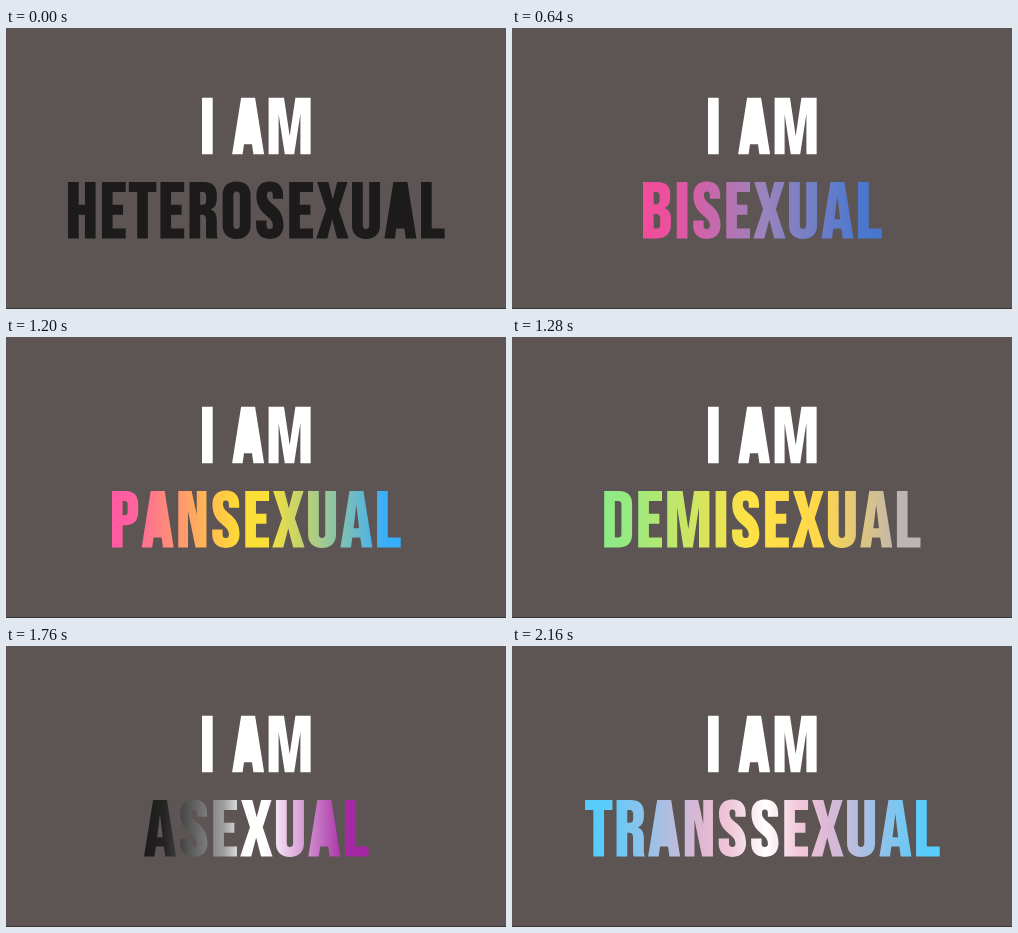
An HTML page for the animation above (2.24 s loop, 500x281 px).

```html
<!DOCTYPE html>
<html lang="en">
<head>
<meta charset="utf-8">
<title>I am</title>
<style>
  html, body { margin: 0; width: 100%; height: 100%; overflow: hidden; background: #5d5553; }
  svg { display: block; width: 100%; height: 100%; }
  clipPath path { clip-rule: evenodd; }
  .word { visibility: hidden; animation: turn 2240ms step-end infinite; }
  @keyframes turn {
    0% { visibility: visible; }
    14.2857%, 100% { visibility: hidden; }
  }
</style>
</head>
<body>
<svg id="stage" viewBox="0 0 500 281" preserveAspectRatio="none" role="img">
  <rect width="500" height="281" fill="#5d5553"/>
  <rect y="280" width="500" height="1" fill="#3c3736"/>
</svg>
<script>
const SLOT = 320, CENTER = 250.4, TRACKING = 0.3, CAP_SCALE = 0.99;

// Condensed capitals, 57 units tall: [left bearing, width, right bearing, outline]
const GLYPHS = {
  A: [1.3, 32, 1.3, 'M0 57L9 0H23L32 57H21.3L19.9 47H11.9L10.5 57ZM13.1 37.5H18.7L15.9 14Z'],
  B: [3, 28, 2.5, 'M0 0H14C23 0 27.3 4 27.3 12.6V15.2C27.3 21 25.5 24.6 21.6 26.3C26.2 28 28 31.8 28 37.4V42.5C28 52 23 57 14 57H0ZM10.7 10V22.5H13.2C15.3 22.5 16.6 21.5 16.6 19V13.7C16.6 11.2 15.5 10 13.3 10ZM10.7 32.3V47H14C16 47 17.3 46 17.3 43.2V37.6C17.3 33.7 16 32.3 13 32.3Z'],
  D: [3, 28, 2.8, 'M0 0H14.5C23.5 0 28 4.5 28 13.5V43.5C28 52.5 23.5 57 14.5 57H0ZM10.7 10V47H14C16 47 17.3 46 17.3 43.8V13.2C17.3 11 16 10 14 10Z'],
  E: [3, 23.8, 2, 'M0 0H23.8V10H10.7V23H21.2V33H10.7V47H23.8V57H0Z'],
  H: [3, 27.6, 3, 'M0 0H10.7V23H16.9V0H27.6V57H16.9V33H10.7V57H0Z'],
  I: [3, 10.7, 3, 'M0 0H10.7V57H0Z'],
  L: [3, 23.8, 1, 'M0 0H10.7V47H23.8V57H0Z'],
  M: [2.9, 42.2, 2.9, 'M0 0H15.4L21.1 38.5L26.8 0H42.2V57H31.8V16L25.6 57H16.2L10 16.5V57H0Z'],
  N: [3, 28.2, 3, 'M0 0H13.4L18.5 24V0H28.2V57H17.3L9.7 20V57H0Z'],
  O: [2.8, 28, 2.8, 'M14 -.5C23 -.5 28 4.5 28 13.5V43.5C28 52.5 23 57.5 14 57.5S0 52.5 0 43.5V13.5C0 4.5 5 -.5 14 -.5ZM14 9.5C12 9.5 10.8 10.8 10.8 13V44C10.8 46.2 12 47.5 14 47.5S17.2 46.2 17.2 44V13C17.2 10.8 16 9.5 14 9.5Z'],
  P: [3, 26.2, 1.9, 'M0 0H13C22 0 26.2 4.5 26.2 13.5V21C26.2 30 22 34.5 13 34.5H10.7V57H0ZM10.7 10V24.5H12.6C14.6 24.5 15.6 23.5 15.6 21.3V13.2C15.6 11 14.6 10 12.6 10Z'],
  R: [3, 28, 2, 'M0 0H14C23 0 27.3 4.2 27.3 13V16.5C27.3 22.5 25.3 26 21.3 27.7C25.5 29.3 27.3 32.8 27.3 38.5V48.5C27.3 52.5 27.4 54.8 28.2 57H17.2C16.7 55.6 16.5 54.5 16.5 48.5V38C16.5 34.2 15 33 12 33H10.7V57H0ZM10.7 10V23H13.2C15.3 23 16.6 22 16.6 19.5V14C16.6 11.2 15.5 10 13.3 10Z'],
  S: [2.4, 27.4, 2.4, 'M13.7 -.5C22.6 -.5 27 4.6 27 13.7V17H16.7V13C16.7 10.5 15.7 9.5 13.7 9.5S10.8 10.5 10.8 13.3C10.8 23 27.4 23.5 27.4 43.3C27.4 52.5 22.5 57.5 13.7 57.5S0 52.5 0 43.3V39H10.4V44C10.4 46.7 11.6 47.5 13.7 47.5S16.8 46.7 16.8 43.8C16.8 34 .3 33.5 .3 13.7C.3 4.6 5 -.5 13.7 -.5Z'],
  T: [.8, 27.5, .8, 'M0 0H27.5V10H19.1V57H8.4V10H0Z'],
  U: [2.8, 28, 2.8, 'M0 0H10.8V44C10.8 46.2 12 47.5 14 47.5S17.2 46.2 17.2 44V0H28V43.5C28 52.5 23 57.5 14 57.5S0 52.5 0 43.5Z'],
  X: [.9, 32.4, .3, 'M.9 0H12.2L16.6 17.5L21 0H31.4L22.6 27.5L32.4 57H20.9L16 38L11.1 57H0L9.8 27.5Z'],
  ' ': [0, 14.5, 0, '']
};

// Each word with its colour stops, "colour position%"
const WORDS = [
  ['HETEROSEXUAL', '#1c1a1b 0'],
  ['HOMOSEXUAL', '#ff4f52 0,#ff5450 8,#ff9a58 18,#fff564 27,#d8ff62 33,#62e068 42,#48dc80 49,#62e6ea 61,#5a68a6 72,#66589e 78,#f45cd8 88,#ff5cd8 100'],
  ['BISEXUAL', '#f04d9c 0,#ee4f9d 9,#9b84bd 50,#4a78cf 92,#4876cf 100'],
  ['PANSEXUAL', '#ff5aa2 0,#ff5fa0 6,#ffdc34 44,#f8e138 54,#38adfb 95,#35adff 100'],
  ['DEMISEXUAL', '#8deb88 0,#96ea82 7,#ffe145 46,#ffd84a 68,#bdb4b4 94,#bdb4b4 100'],
  ['ASEXUAL', '#1c1a1b 0,#242223 9,#a2a2a2 36,#ffffff 45,#ffffff 54,#a629a4 90,#a227a2 100'],
  ['TRANSSEXUAL', '#55cdfc 0,#5acbfa 6,#e0b6d2 33,#f0c8d8 41,#ffffff 51,#f2c8da 60,#deb8d4 68,#5acbfa 95,#55cdfc 100']
];

const stage = document.getElementById('stage');

function add(parent, tag, attrs) {
  const el = document.createElementNS('http://www.w3.org/2000/svg', tag);
  for (const key in attrs) el.setAttribute(key, attrs[key]);
  return parent.appendChild(el);
}

function layOut(text) {
  let x = 0;
  const spots = [...text].map((ch, i) => {
    const [left, width, right, d] = GLYPHS[ch];
    if (i) x += left + TRACKING;
    const spot = { x, d };
    x += width + (i < text.length - 1 ? right : 0);
    return spot;
  });
  return { spots, width: x };
}

function drawWord(text, stops, y, id) {
  const { spots, width } = layOut(text);
  const start = CENTER - width / 2;
  const group = add(stage, 'g', { 'aria-label': text });
  const clip = add(group, 'clipPath', { id: 'clip' + id });
  for (const { x, d } of spots)
    if (d) add(clip, 'path', { d, transform: `translate(${start + x} ${y}) scale(1 ${CAP_SCALE})` });
  const paint = add(group, 'linearGradient', { id: 'paint' + id });
  for (const stop of stops.split(',')) {
    const [color, at] = stop.split(' ');
    add(paint, 'stop', { offset: at + '%', 'stop-color': color });
  }
  add(group, 'rect', {
    x: start, y: y - 2, width, height: 61,
    fill: `url(#paint${id})`, 'clip-path': `url(#clip${id})`
  });
  return group;
}

drawWord('I AM', '#ffffff 0', 69.8, 'Lead');
WORDS.forEach(([text, stops], i) => {
  const word = drawWord(text, stops, 154, i);
  word.setAttribute('class', 'word');
  word.style.animationDelay = (i ? i - WORDS.length : 0) * SLOT + 'ms';
});
</script>
</body>
</html>
```
